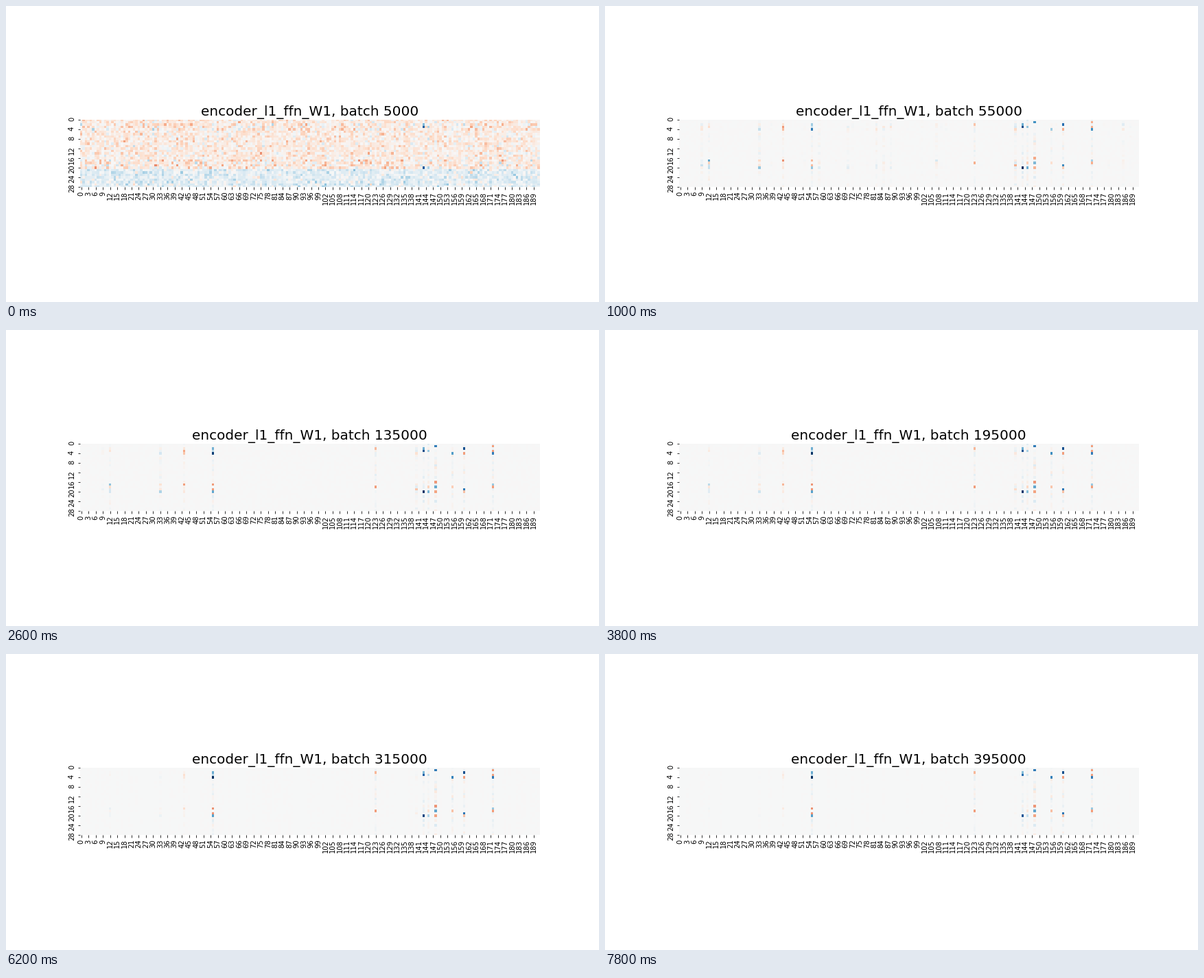
A matplotlib script for the animation above (8000 ms loop, 864 by 432 pixels).

```python
import numpy as np
import matplotlib.pyplot as plt
from matplotlib.animation import FuncAnimation

ROWS, COLS, STEPS = 29, 192, 40
ACTIVE = [2, 3, 4, 17, 18, 19, 20]

# Dominant cells of the columns that survive training: {column: {row: weight}}
PEAKS = {
    55: {2: .5, 3: .28, 4: 1, 17: -.45, 19: -.45, 20: .55},
    123: {2: -.33, 18: -.42},
    143: {2: .5, 3: .9, 20: 1},
    145: {3: .4, 18: -.25, 20: .5},
    148: {1: .7, 16: -.44, 18: .52, 20: -.4},
    155: {4: .68, 18: -.3},
    160: {2: .88, 4: -.42, 19: .72, 20: -.3},
    172: {1: -.42, 3: -.42, 4: .7, 17: .38, 18: -.42},
}
RISE = {55: 5, 143: .5, 145: 1, 155: 8}   # growth time in steps, else 3
LIFE = {143: 100, 145: 45}                # fade time in steps, else endless
# Columns with a seeded profile that die out: {column: fade time}
FADING = {9: 10, 12: 22, 33: 22, 43: 30, 140: 22,
          **dict.fromkeys([58, 70, 82, 85, 88, 107, 185], 6)}

rng = np.random.default_rng(5000)
row = np.arange(ROWS)[:, None]
active = np.isin(row, ACTIVE)


def noise(scale):
    return scale * rng.normal(size=(ROWS, COLS))


# First step: reddish upper rows, bluish lower rows
start = np.where(row < 21, -.085, .11) + noise(np.where(active, .13, .1))

# Second step: faint stripes that die out column by column
stripe = np.clip(rng.lognormal(-.3, .55, COLS), .2, 2)
early = np.clip(noise(np.where(active, .1, .04)) * stripe, -.4, .45)
decay = .5 + .5 * stripe

layers = []
for c, peaks in PEAKS.items():
    column = rng.normal(0, .045, ROWS)
    column[list(peaks)] = list(peaks.values())
    layers.append((c, column, RISE.get(c, 3), LIFE.get(c, np.inf)))
for c, life in FADING.items():
    column = rng.normal(0, .04, ROWS)
    column[ACTIVE] = rng.normal(0, .25 if life > 6 else .16, len(ACTIVE))
    layers.append((c, column, 2, life))


def weights(i):
    w = start.copy() if i == 0 else early * np.exp(-(i - 1) / decay)
    for c, column, rise, life in layers:
        strength = (1 - np.exp(-(i + 1) / rise)) * np.exp(-(i / life) ** 2)
        w[:, c] = .6 * w[:, c] + column * strength
    return w


fig, ax = plt.subplots(figsize=(12, 6), dpi=72, facecolor="white")
fig.subplots_adjust(left=.125, right=.9, bottom=.125, top=.88)
mesh = ax.pcolormesh(weights(0), cmap="RdBu", vmin=-1, vmax=1)
ax.set(xlim=(0, COLS), ylim=(ROWS - .5, .5), aspect="equal")
ax.spines[:].set_visible(False)
xt, yt = np.arange(0, COLS, 3), np.arange(0, ROWS, 4)
ax.set_xticks(xt + .5, xt, rotation=90, fontsize=10)
ax.set_yticks(yt + .5, yt, rotation=90, fontsize=10)
title = ax.set_title("", fontsize=20, y=1.0)


def update(i):
    mesh.set_array(weights(i))
    title.set_text(f"encoder_l1_ffn_W1, batch {5000 + 10000 * i}")
    return mesh, title


anim = FuncAnimation(fig, update, frames=STEPS, interval=200, repeat=True,
                     repeat_delay=0, blit=False)
plt.show()
```
